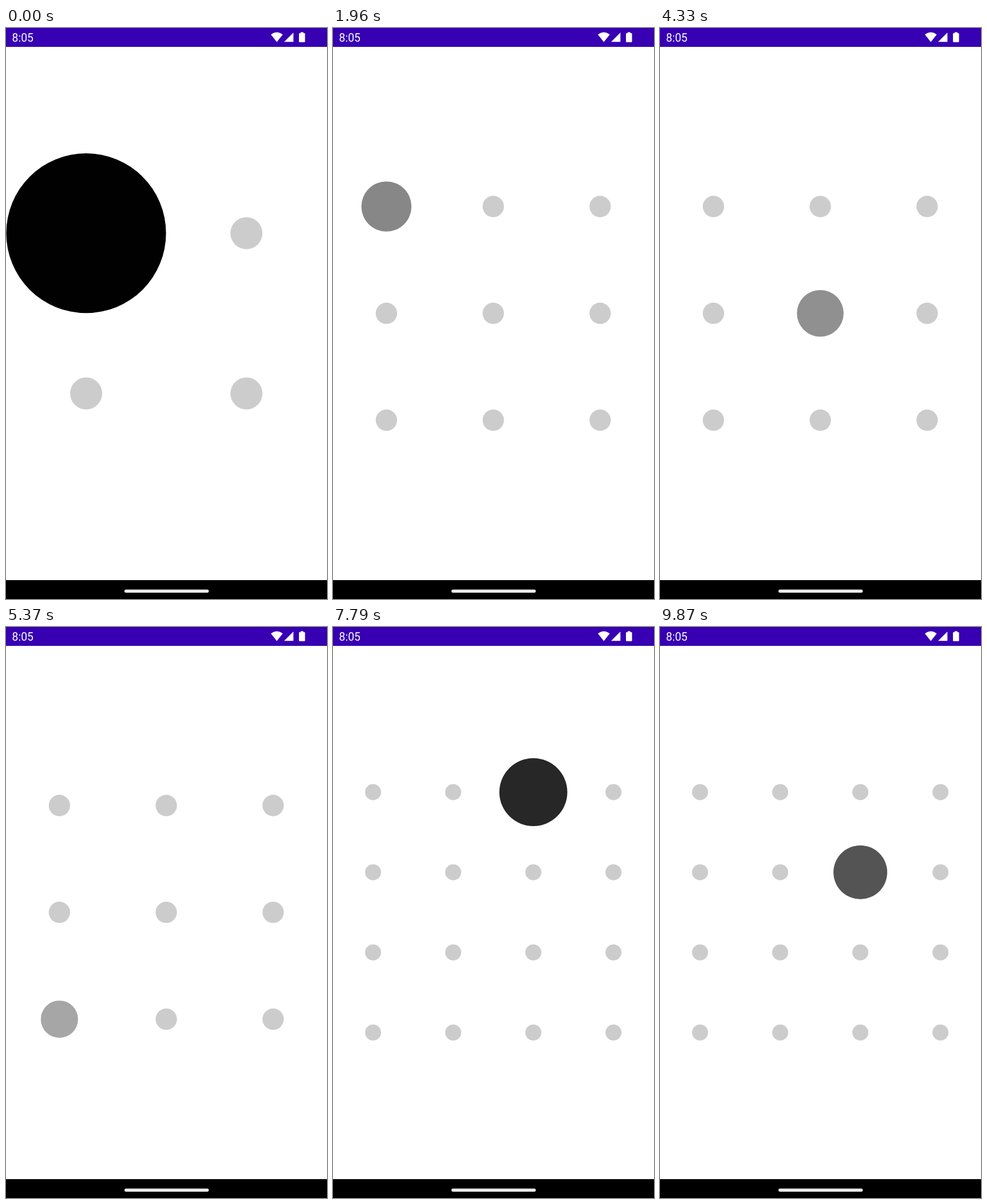
Write an HTML page with a canvas that moves like this. It is 561 by 998 pixels and loops after 9.91 s.

```html
<!DOCTYPE html>
<html lang="en">
<head>
<meta charset="utf-8">
<title>Dot grid loader</title>
<style>
  html, body { margin: 0; width: 100%; height: 100%; overflow: hidden; background: #fff; }
  canvas { display: block; }
</style>
</head>
<body>
<canvas id="stage" width="561" height="998"></canvas>
<script>
const ctx = document.getElementById('stage').getContext('2d');
const LOOP = 9910;
const GRID_SIZE = 560.2;
const CENTER_Y = 498.7;
const MIN_SCALE = 0.2;

// Each grid runs through its dots row by row, one pulse per dot.
const grids = [
  { count: 2, start: -261, pulse: 522 },
  { count: 3, start: 1876, pulse: 506 },
  { count: 4, start: 6478, pulse: 506 }
];

function fillPath(path, color) {
  ctx.fillStyle = color;
  ctx.fill(new Path2D(path));
}

function roundRect(x, y, w, h, r, color) {
  ctx.fillStyle = color;
  ctx.beginPath();
  ctx.roundRect(x, y, w, h, r);
  ctx.fill();
}

function drawStatusBar() {
  ctx.fillStyle = '#3700b3';
  ctx.fillRect(0, 0, 561, 33);
  ctx.fillStyle = '#fff';
  ctx.font = '19.4px Roboto, sans-serif';
  ctx.fillText('8:05', 10.6, 24);
  fillPath('M463 11.6Q473.3 3.6 483.6 11.6L473.3 24.4Z', '#fff');
  fillPath('M502.3 8V24.3H486Z', '#fff');
  roundRect(512, 9, 10.6, 15.8, 1.3, '#fff');
  ctx.fillRect(514.9, 7.3, 4.8, 2.5);
}

function drawNavBar() {
  ctx.fillStyle = '#000';
  ctx.fillRect(0, 965, 561, 33);
  roundRect(207, 981.6, 147.4, 5.4, 2.7, '#ebebeb');
}

function drawDots(time) {
  const { count, start, pulse } = grids.findLast(grid => time >= grid.start);
  const cell = GRID_SIZE / count;
  const position = (time - start) / pulse;
  const active = Math.floor(position);
  const triangle = 1 - Math.abs(2 * (position - active) - 1);

  for (let i = 0; i < count * count; i++) {
    const scale = i === active ? MIN_SCALE + (1 - MIN_SCALE) * triangle : MIN_SCALE;
    const x = (i % count + 0.5) * cell;
    const y = CENTER_Y + (Math.floor(i / count) + 0.5 - count / 2) * cell;
    ctx.fillStyle = `rgba(0, 0, 0, ${scale})`;
    ctx.beginPath();
    ctx.arc(x, y, scale * cell / 2, 0, Math.PI * 2);
    ctx.fill();
  }
}

function draw(time) {
  ctx.fillStyle = '#fff';
  ctx.fillRect(0, 0, 561, 998);
  drawDots(time);
  drawStatusBar();
  drawNavBar();
}

const origin = performance.now();
function tick() {
  draw((performance.now() - origin) % LOOP);
  requestAnimationFrame(tick);
}
tick();
</script>
</body>
</html>
```
